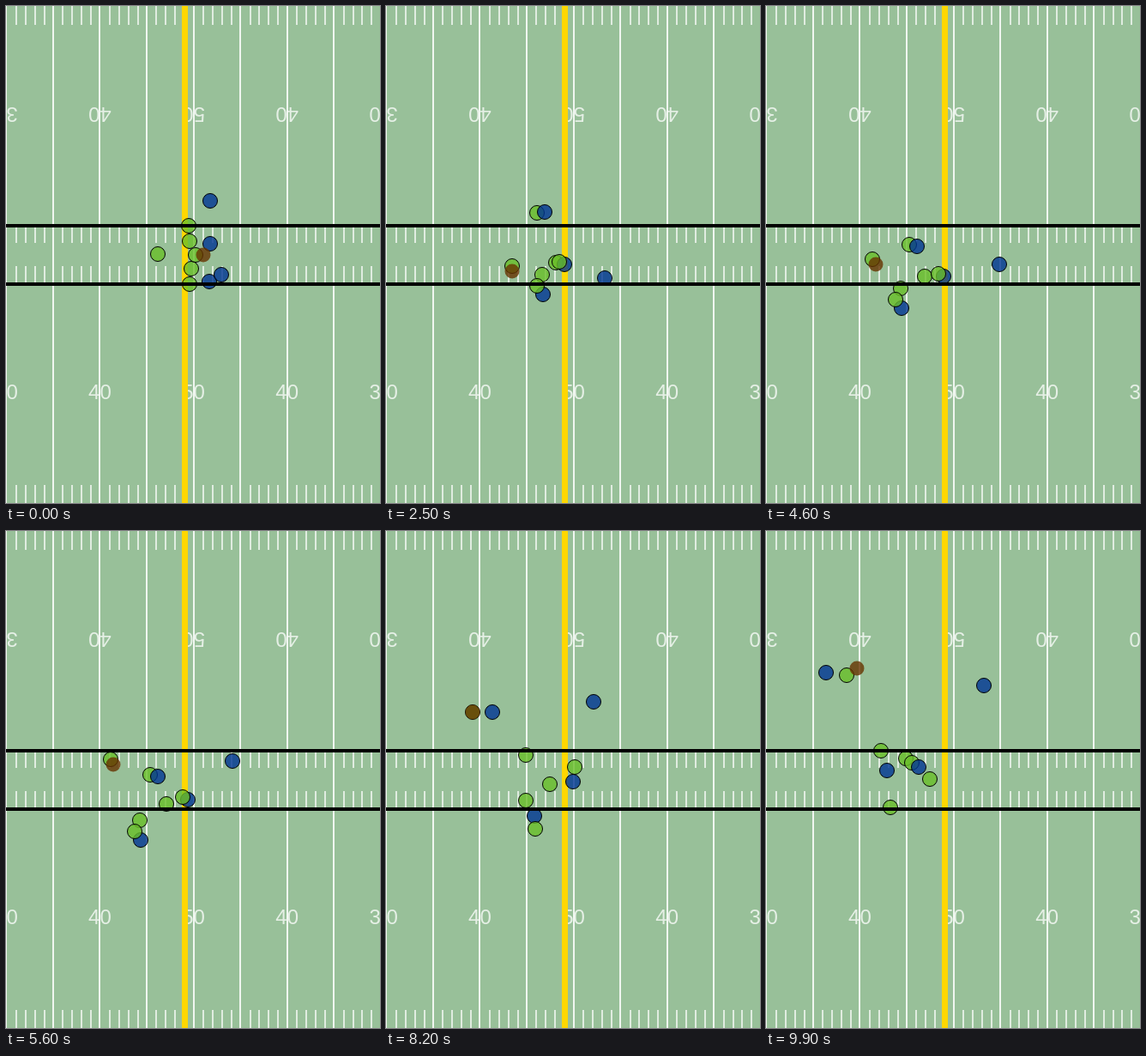
These frames come from a looping animation (436 px wide and 579 px high, 10000 ms). An HTML page:

```html
<!DOCTYPE html>
<html lang="en">
<head>
<meta charset="utf-8">
<title>Football play</title>
<style>
  html, body { margin: 0; width: 100%; height: 100%; overflow: hidden; background: #98c099; }
  svg { display: block; width: 436px; height: 579px; }
  text { font: 24px "Liberation Sans", Arial, sans-serif; fill: #fff; fill-opacity: .75; text-anchor: middle; }
</style>
</head>
<body>
<svg id="stage" viewBox="0 0 436 579"></svg>
<script>
const stage = document.getElementById('stage');
const YARD = 10.91, LEFT = 0.37;
const GREEN = '#69be28', BLUE = '#003594', BROWN = '#663300';

function add(tag, attrs, text) {
  const el = document.createElementNS('http://www.w3.org/2000/svg', tag);
  for (const name in attrs) el.setAttribute(name, attrs[name]);
  if (text) el.textContent = text;
  stage.append(el);
  return el;
}
const rect = (x, y, width, height, fill, alpha = 1) =>
  add('rect', { x, y, width, height, fill, 'fill-opacity': alpha });

function drawField() {
  rect(0, 0, 436, 579, '#98c099');
  for (let n = 0; n <= 40; n++) {
    const x = LEFT + n * YARD;
    if (n % 5 === 0) {
      rect(Math.round(x) - 1, 0, 2, 579, '#fff', .85);
    } else {
      for (const [y, h] of [[0, 22], [257, 19], [303, 20], [558, 21]])
        rect(Math.floor(x), y, 2, h, '#fff', .7);
    }
  }
  for (let i = 0; i < 5; i++) {
    const x = LEFT + i * 10 * YARD, label = 50 - 10 * Math.abs(i - 2);
    add('text', { x, y: 458 }, label);
    add('text', { x, y: 134.5, transform: `rotate(180 ${x} 126)` }, label);
  }
  rect(205, 0, 7, 579, '#ffd700');
}

// All times below are in tenths of a second.
const BEATS = [0, 15, 35, 56, 69, 82, 99];

// 0 before a, 1 after b, smooth between.
function ease(t, a, b) {
  const u = Math.min(1, Math.max(0, (t - a) / (b - a)));
  return u * u * (3 - 2 * u);
}

function slope(points, i, c) {
  if (i === 0) return 0;
  const before = BEATS[i] - BEATS[i - 1];
  const v0 = (points[i][c] - points[i - 1][c]) / before;
  if (i === points.length - 1) return v0;
  const after = BEATS[i + 1] - BEATS[i];
  const v1 = (points[i + 1][c] - points[i][c]) / after;
  return (v0 * after + v1 * before) / (before + after);
}

// A smooth run through one point per beat.
const run = (...points) => t => {
  let i = 0;
  while (i < BEATS.length - 2 && t >= BEATS[i + 1]) i++;
  const span = BEATS[i + 1] - BEATS[i], u = (t - BEATS[i]) / span, v = 1 - u;
  return [0, 1].map(c =>
    v * v * (1 + 2 * u) * points[i][c] + u * u * (3 - 2 * u) * points[i + 1][c] +
    span * u * v * (v * slope(points, i, c) - u * slope(points, i + 1, c)));
};

// Stay beside another player at a changing offset.
const beside = (other, offset) => t => {
  const [x, y] = other(t), [dx, dy] = offset(t);
  return [x + dx, y + dy];
};
const mix = (a, b, k) => a.map((value, c) => value + (b[c] - value) * k);

const passer = run([177, 289], [164, 289], [131, 313], [122, 266], [123, 216], [101, 211], [94, 168]);
const topEnd = run([238, 227], [199, 231], [177, 253], [177, 286], [171, 231], [124, 211], [70, 165]);
const middle = run([238, 277], [216, 291], [205, 309], [212, 313], [224, 290], [218, 292], [178, 275]);
const rover = run([251, 313], [241, 309], [271, 320], [264, 268], [244, 202], [242, 199], [254, 180]);
const lowEnd = run([237, 321], [200, 331], [171, 341], [157, 360], [184, 356], [173, 332], [141, 279]);

// Blockers close in on their man during the first beat and come loose around the fifth.
const topBlock = beside(topEnd, t => [
  -25 + 16 * ease(t, 0, 15),
  29 - 31 * ease(t, 0, 30),
]);
const topTackle = t => {
  const drift = ease(t, 82, 99);
  return mix(topBlock(t), [163 - 29 * drift, 261 - 5 * drift], ease(t, 56, 69));
};
const topGuard = beside(middle, t => [
  -24 + 18 * ease(t, 0, 15) + 19 * ease(t, 69, 99),
  -3 - 14 * ease(t, 69, 82) + 31 * ease(t, 82, 99),
]);
const lowTackle = beside(lowEnd, t => [
  -23 + 16 * ease(t, 0, 15) - 14 * ease(t, 56, 69) + 22 * ease(t, 69, 82) + 3 * ease(t, 82, 99),
  3 - 13 * ease(t, 0, 25) + 25 * ease(t, 56, 82) + 28 * ease(t, 82, 99),
]);
const lowGuard = beside(lowTackle, t => [
  2 + 4 * ease(t, 0, 15) - 17 * ease(t, 69, 82) + 29 * ease(t, 82, 99),
  -18 + 5 * ease(t, 0, 15) - 20 * ease(t, 60, 82) - 24 * ease(t, 82, 99),
]);

// The center fills the gap between the guards.
const center = beside(t => mix(topGuard(t), lowGuard(t), .5), t => {
  const lean = 6 - 13 * ease(t, 66, 99);
  return [lean, -lean * ease(t, 0, 15) - 14 * ease(t, 82, 99)];
});

// Snapped back, carried with a slight sway, then thrown.
const ball = beside(passer, t => {
  const carry = ease(t, 5, 18) - ease(t, 70, 82);
  const toss = Math.max(0, (t - 95) / 4);
  return [
    53 * (1 - ease(t, 0, 8)) + carry * (1 + 3 * Math.sin((t - 28) * .085)) + 12 * toss,
    1 - ease(t, 0, 8) + 5.5 * carry - 8 * toss,
  ];
});

const dots = [];
function addDot(where, fill, outline = '#000') {
  const el = add('circle', { r: 8.5, fill, 'fill-opacity': .8, stroke: outline });
  dots.push({ where, el });
}

drawField();
addDot(lowEnd, BLUE);
addDot(topTackle, GREEN);
addDot(topEnd, BLUE);
addDot(lowGuard, GREEN);
addDot(center, GREEN);
addDot(middle, BLUE);
addDot(topGuard, GREEN);
addDot(lowTackle, GREEN);
addDot(passer, GREEN);
addDot(rover, BLUE);
addDot(ball, BROWN, 'none');
rect(0, 254, 436, 4, '#000');
rect(0, 322, 436, 4, '#000');

function draw(now) {
  const t = Math.floor(now / 100) % 100;
  for (const { where, el } of dots) {
    const [x, y] = where(t);
    el.setAttribute('cx', Math.round(x));
    el.setAttribute('cy', Math.round(y));
  }
}

const start = performance.now();
function tick() {
  draw(performance.now() - start);
  requestAnimationFrame(tick);
}
tick();
</script>
</body>
</html>
```
